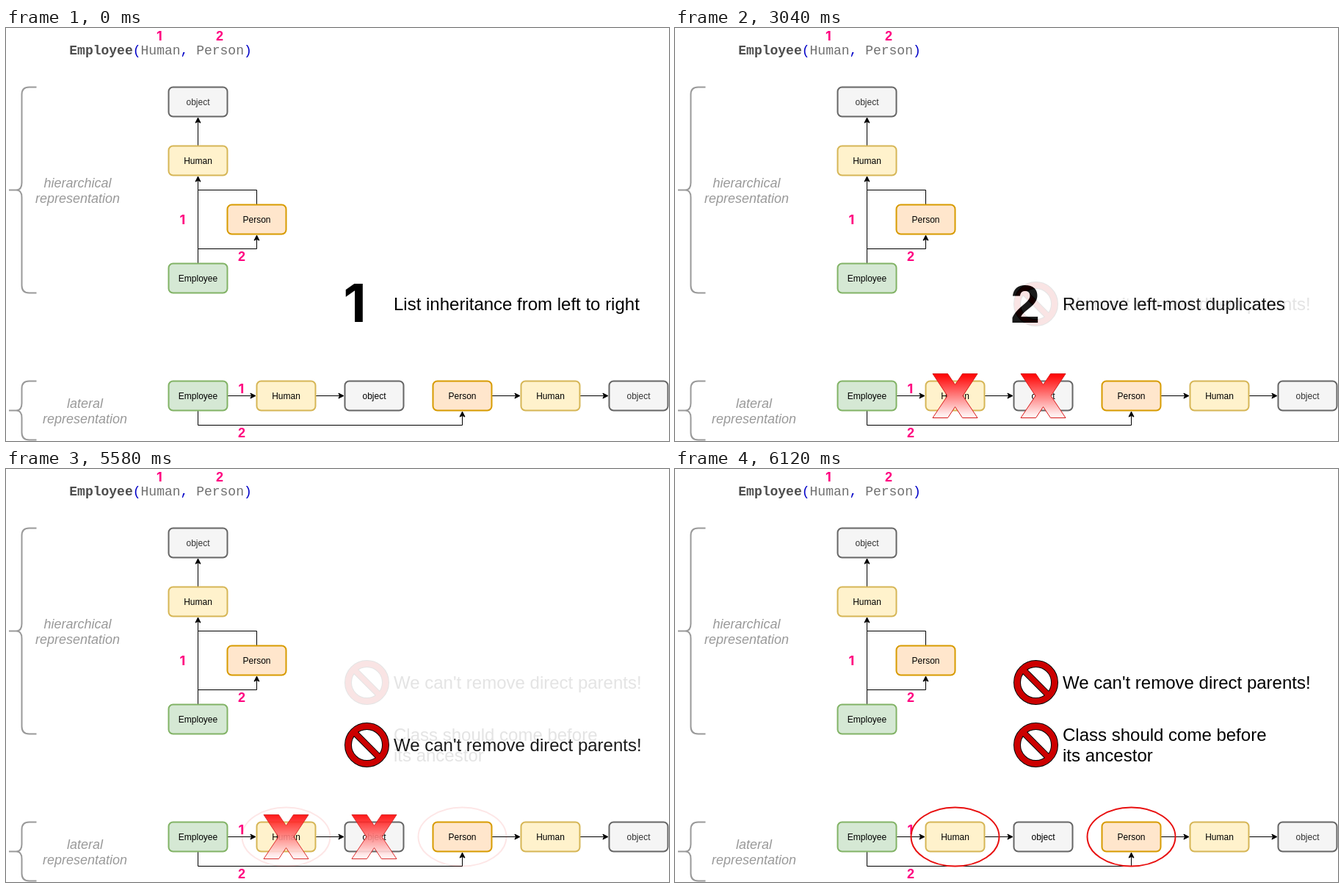
Write an HTML page that moves like this. It is 903 px wide and 562 px high and loops after 8000 ms.

```html
<!DOCTYPE html>
<html lang="en">
<head>
<meta charset="utf-8">
<style>
  html, body { margin: 0; width: 100%; height: 100%; overflow: hidden; background: #fff; }
  svg { display: block; font-family: "Liberation Sans", Arial, sans-serif; }
  .label { font-size: 12px; text-anchor: middle; }
  .side { font-size: 18px; font-style: italic; fill: #999; text-anchor: middle; }
  .code { font: 18px "Liberation Mono", "Courier New", monospace; fill: #707070; }
  .msg { font-size: 24px; }
  .num { font-size: 18px; font-weight: bold; fill: #ff0080; text-anchor: middle; }
  .step { font-size: 72px; font-weight: bold; text-anchor: middle; }
  .one { font-family: Inter, sans-serif; }
  .line { fill: none; stroke: #000; }
  .bracket { fill: none; stroke: #999; stroke-width: 2; }
  .ring { fill: none; stroke: #e81010; stroke-width: 2; }
</style>
</head>
<body>
<svg id="stage" width="903" height="562" viewBox="0 0 903 562"></svg>
<script>
const STYLES = {
  object: ['#f5f5f5', '#666', '#333'],
  Human: ['#fff2cc', '#d6b656', '#000'],
  Person: ['#ffe6cc', '#d79b00', '#000'],
  Employee: ['#d5e8d4', '#82b366', '#000']
};

const text = (cls, x, y, s) => `<text class="${cls}" x="${x}" y="${y}">${s}</text>`;

function box(name, x, y, ink) {
  const [fill, stroke, color] = STYLES[name];
  return `<rect x="${x + .5}" y="${y + .5}" width="80" height="40" rx="6" fill="${fill}" stroke="${stroke}" stroke-width="2"/>
    <text class="label" x="${x + 40.5}" y="${y + 25}" fill="${ink || color}">${name}</text>`;
}

const line = d => `<path class="line" d="${d}"/>`;
const head = (x, y, turn) =>
  `<path transform="translate(${x} ${y}) rotate(${turn})" stroke="#000" d="M0 0l-3.5 7 3.5-1.75 3.5 1.75z"/>`;
const up = (x, y) => head(x, y + 1.1, 0);
const right = x => line(`M${x - 39} 500.5H${x - 5}`) + head(x - 1.1, 500.5, 90);

const bracket = (top, bottom) => {
  const mid = (top + bottom) / 2;
  return `<path class="bracket" d="M41.5 ${top}H31.5Q21.5 ${top} 21.5 ${top + 10}V${mid - 10}Q21.5 ${mid} 14 ${mid}H4
    H14Q21.5 ${mid} 21.5 ${mid + 10}V${bottom - 10}Q21.5 ${bottom} 31.5 ${bottom}H41.5"/>`;
};

const num = (n, x, y) => text(n === 1 ? 'num one' : 'num', x, y, n);

const banPass = (color, ringWidth, barWidth) =>
  `<g fill="none" stroke="${color}"><circle r="25.5" stroke-width="${ringWidth}"/>
   <path d="M-18-18L18 18" stroke-width="${barWidth}"/></g>`;
const ban = y => `<g transform="translate(491.5 ${y})">${banPass('#000', 10, 9)}${banPass('#c00', 8, 7)}</g>`;

const cross = x => `<path transform="translate(${x} 500.5)" fill="url(#fade)" stroke="#d81818"
  d="M-30.5-30H-10L0-15 10-30H30.5L10.5 0 30.5 30H10L0 15-10 30H-30.5L-10.5 0z"/>`;
const ring = x => `<ellipse class="ring" cx="${x}" cy="500.5" rx="60" ry="40"/>`;
const panel = s => `<g class="panel"><rect x="450" y="250" width="453" height="170" fill="#fff"/>${s}</g>`;

const stage = document.getElementById('stage');
stage.innerHTML = [
  '<defs><linearGradient id="fade" x2="0" y2="1"><stop stop-color="red"/><stop offset="1" stop-color="#fff"/></linearGradient></defs>',
  '<text class="code" x="86.3" y="36"><tspan font-weight="bold" fill="#4d4d4d">Employee</tspan><tspan fill="#0000c8">(</tspan>Human<tspan fill="#0000c8">,</tspan> Person<tspan fill="#0000c8">)</tspan></text>',
  bracket(80.5, 360.5), bracket(480.5, 560.5),
  text('side', 97.5, 217, 'hierarchical'), text('side', 97.5, 238, 'representation'),
  text('side', 107.5, 517, 'lateral'), text('side', 107.5, 538, 'representation'),

  line('M261.5 160V126'), up(261.5, 121),
  line('M261.5 320V206'), up(261.5, 201),
  line('M341.5 240V220.5H261.5'),
  line('M261.5 300.5H341.5V286'), up(341.5, 281),
  box('object', 221, 80), box('Human', 221, 160), box('Person', 301, 240), box('Employee', 221, 320),

  [341, 461, 701, 821].map(right).join(''),
  line('M261.5 521V540.5H621.5V526'), up(621.5, 521),
  box('Employee', 221, 480), box('Human', 341, 480), box('object', 461, 480, '#000'),
  box('Person', 581, 480), box('Human', 701, 480), box('object', 821, 480),

  num(1, 209, 17), num(2, 291, 17), num(1, 240.5, 267), num(2, 321, 317),
  num(1, 320.5, 497), num(2, 321, 557),

  panel(text('step one', 475, 400, 1) + text('msg', 528, 384, 'List inheritance from left to right')),
  panel(text('step', 477, 400.5, 2) + text('msg', 528, 384, 'Remove left-most duplicates')),
  panel(ban(375.5) + text('msg', 528, 384, "We can't remove direct parents!")),
  panel(ban(290.5) + text('msg', 528, 299, "We can't remove direct parents!") +
    ban(375.5) + text('msg', 528, 370, 'Class should come before') + text('msg', 528, 398, 'its ancestor')),
  `<g id="crosses">${cross(381.5)}${cross(501.5)}</g>`,
  `<g id="rings">${ring(381.5)}${ring(621.5)}</g>`
].join('');

const panels = stage.querySelectorAll('.panel');
const crosses = document.getElementById('crosses');
const rings = document.getElementById('rings');

// Cross-fade in ten steps of 60 ms, the first one already visible.
const fade = (t, start) => Math.min(10, Math.max(0, Math.floor((t - start) / 60) + 1)) / 10;

const origin = performance.now();
function draw() {
  const t = (performance.now() - origin) % 8000;
  const shown = [1, fade(t, 500), fade(t, 3040), fade(t, 5580)];
  panels.forEach((p, i) => p.setAttribute('opacity', shown[i]));
  crosses.setAttribute('opacity', shown[1] * (1 - shown[3]));
  rings.setAttribute('opacity', shown[3]);
  requestAnimationFrame(draw);
}
draw();
</script>
</body>
</html>
```
